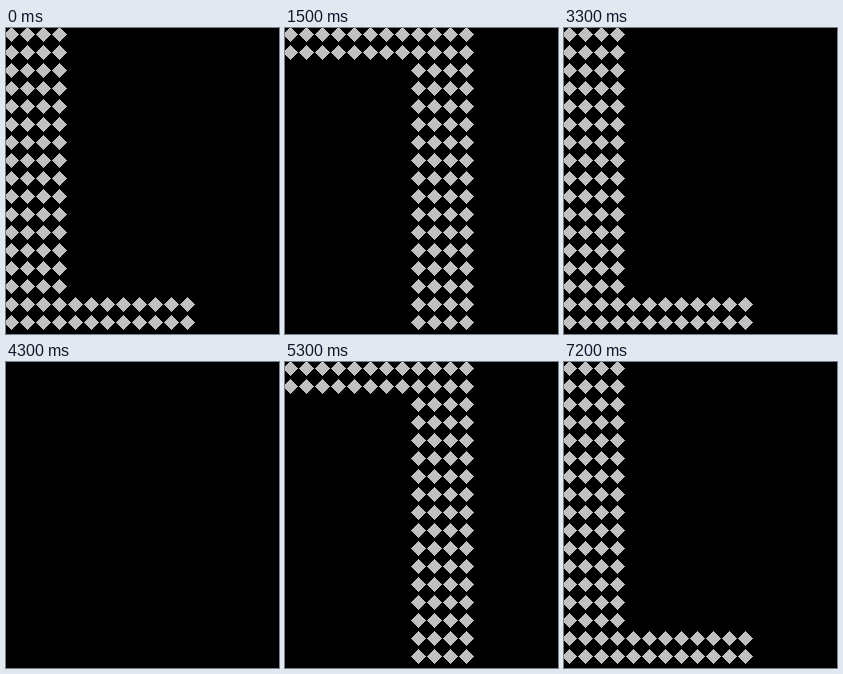
Recreate the animation shown at these times as an HTML page. Size 273 by 306 pixels, loop 8000 ms.

```html
<!DOCTYPE html>
<html lang="en">
<head>
<meta charset="utf-8">
<title>Turning L</title>
<style>
  html, body { margin: 0; width: 100%; height: 100%; overflow: hidden; background: #000; }
  svg { display: block; width: 273px; height: 306px; }
  .pose { fill: url(#diamonds); opacity: 0; animation: 8s step-end infinite; }
  #up { animation-name: up; }
  #right { animation-name: right; }
  #down { animation-name: down; }
  #left { animation-name: left; }

  /* Each pose is a quarter turn clockwise; a blank flash shows at 53.75% and 77.5%. */
  @keyframes up {
    0%, 41.25%, 90%, 100% { opacity: 1; }
    7.5%, 53.75% { opacity: 0; }
  }
  @keyframes right {
    0%, 18.75%, 66.25%, 100% { opacity: 0; }
    7.5%, 55% { opacity: 1; }
  }
  @keyframes down {
    0%, 31.25%, 77.5%, 100% { opacity: 0; }
    18.75%, 66.25% { opacity: 1; }
  }
  @keyframes left {
    0%, 41.25%, 90%, 100% { opacity: 0; }
    31.25%, 78.75% { opacity: 1; }
  }
</style>
</head>
<body>
<svg viewBox="0 0 273 306">
  <defs>
    <pattern id="diamonds" width="16" height="18" patternUnits="userSpaceOnUse">
      <path d="M7.5 -.1L15.1 7.5L7.5 15.1L-.1 7.5Z" fill="#c0c0c0" shape-rendering="crispEdges"/>
    </pattern>
  </defs>
  <g transform="translate(-2 -1)">
    <path class="pose" id="up" d="M0 0H64V270H192V306H0Z"/>
    <path class="pose" id="right" d="M0 0H272V72H32V216H0Z"/>
    <path class="pose" id="down" d="M0 0H192V306H128V36H0Z"/>
    <path class="pose" id="left" d="M240 0H272V216H0V144H240Z"/>
  </g>
</svg>
</body>
</html>
```
